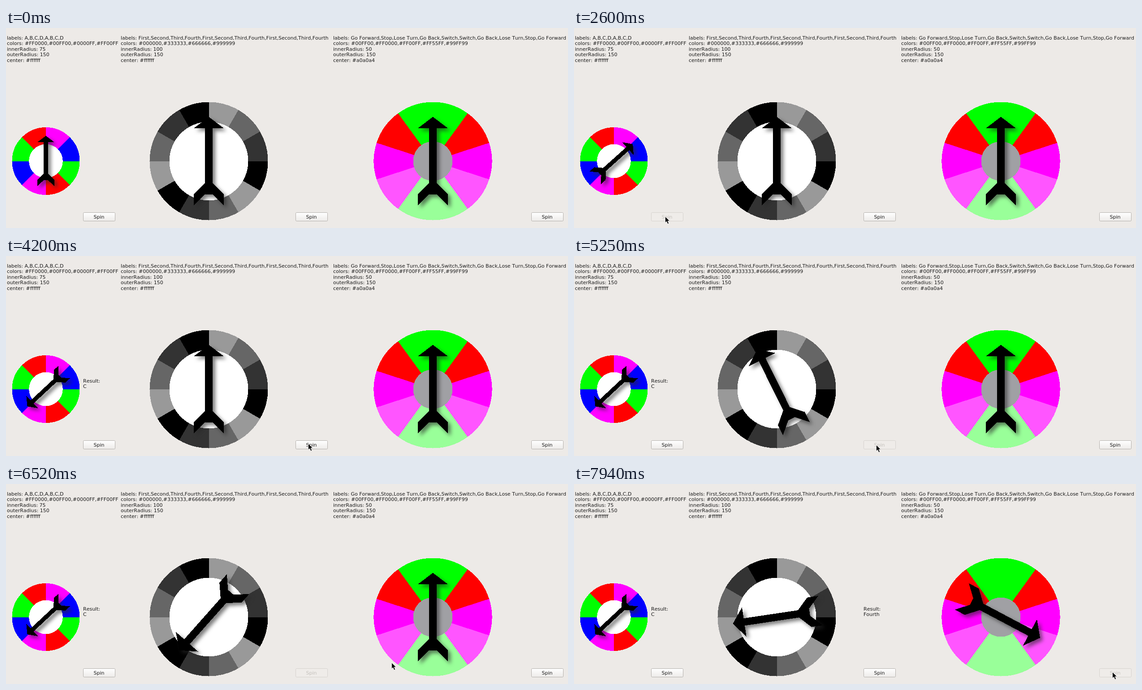
An HTML page for the animation above (8 s loop, 1254 px wide and 447 px high).

```html
<!DOCTYPE html>
<html lang="en">
<head>
<meta charset="utf-8">
<title>Spinners</title>
<style>
  html, body { margin: 0; width: 100%; height: 100%; overflow: hidden; background: #edeae7; }
  svg { display: block; width: 100%; height: 100%; }
  text { font: 11px "DejaVu Sans", sans-serif; font-kerning: none; fill: #1a1a1a; white-space: pre; }
  .crisp { shape-rendering: crispEdges; }
  .shadow { filter: drop-shadow(6px 6px 4px rgba(40, 40, 40, .6)); }
  .button text { text-anchor: middle; }
  .button rect { fill: url(#face); stroke: #b4b0ac; }
  .button.off rect { fill: #efece9; stroke: #d6d2ce; }
  .button.off text { fill: #c4c0bc; }
</style>
</head>
<body>
<svg id="stage" viewBox="0 0 1254 447">
  <defs>
    <linearGradient id="face" x2="0" y2="1">
      <stop offset="0" stop-color="#fff"/>
      <stop offset="1" stop-color="#edebe9"/>
    </linearGradient>
  </defs>
</svg>
<script>
const LOOP = 8000, STEP = 74, CY = 297.5;
const stage = document.getElementById('stage');
const ARROW = 'M0-99L33.3-73.5H8.2V49L33.3 73.5V98.5L8.2 74H-8.2L-33.3 98.5V73.5L-8.2 49V-73.5H-33.3Z';

// Sector colours run counter-clockwise from the top.
const spinners = [
  {
    textX: 2, cx: 89, radius: 75.5, hole: 37.8, buttonX: 172,
    colors: ['#f00', '#0f0', '#00f', '#f0f'], sectors: 8, center: '#fff',
    info: ['labels: A,B,C,D,A,B,C,D', 'colors: #FF0000,#00FF00,#0000FF,#FF00FF',
      'innerRadius: 75', 'outerRadius: 150', 'center: #ffffff'],
    press: 2135, start: 2155, duration: 1555, turn: 947, result: 'C'
  },
  {
    textX: 256, cx: 452.5, radius: 132, hole: 88, buttonX: 646,
    colors: ['#000', '#333', '#666', '#999'], sectors: 12, center: '#fff',
    info: ['labels: ' + Array(3).fill('First,Second,Third,Fourth').join(),
      'colors: #000000,#333333,#666666,#999999',
      'innerRadius: 100', 'outerRadius: 150', 'center: #ffffff'],
    press: 4805, start: 4825, duration: 1997, turn: 981.5, result: 'Fourth'
  },
  {
    textX: 730, cx: 952.5, radius: 132, hole: 44, buttonX: 1172,
    colors: ['#0f0', '#f00', '#f0f', '#f5f', '#9f9', '#9f9', '#f5f', '#f0f', '#f00', '#0f0'],
    sectors: 10, center: '#a0a0a4',
    info: ['labels: Go Forward,Stop,Lose Turn,Go Back,Switch,Switch,Go Back,Lose Turn,Stop,Go Forward',
      'colors: #00FF00,#FF0000,#FF00FF,#FF55FF,#99FF99',
      'innerRadius: 50', 'outerRadius: 150', 'center: #a0a0a4'],
    press: 7690, start: 7710, duration: 2000, turn: 686, result: ''
  }
];

// Pointer stops: time, x, y
const stops = [
  [440, 1149, 436], [880, 328, 281], [1020, 328, 281], [1760, 203, 421],
  [2950, 203, 421], [3108, 228, 416], [3760, 660, 404], [4360, 676, 421],
  [4650, 676, 422], [4810, 674, 422], [5620, 674, 422], [5920, 670, 414],
  [6360, 848, 405], [6512, 860, 399], [7020, 1201, 422], [7330, 1201, 421],
  [7410, 1201, 420]
];

function add(parent, tag, attrs, content) {
  const el = document.createElementNS('http://www.w3.org/2000/svg', tag);
  for (const key in attrs) el.setAttribute(key, attrs[key]);
  if (content) el.textContent = content;
  return parent.appendChild(el);
}

function sector(r, from, to) {
  const at = a => `${-r * Math.sin(a)} ${-r * Math.cos(a)}`;
  return `M0 0L${at(from)}A${r} ${r} 0 0 0 ${at(to)}Z`;
}

function build(s) {
  s.info.forEach((line, i) =>
    add(stage, 'text', { x: s.textX, y: Math.round(26 + i * 12.45) }, line));

  const wheel = add(stage, 'g', { transform: `translate(${s.cx} ${CY})`, class: 'crisp' });
  const slice = 2 * Math.PI / s.sectors;
  for (let i = 0; i < s.sectors; i++) {
    add(wheel, 'path', {
      d: sector(s.radius, i * slice, (i + 1) * slice),
      fill: s.colors[i % s.colors.length]
    });
  }
  add(wheel, 'circle', { r: s.hole, fill: s.center });
  s.arrow = add(add(wheel, 'g', { class: 'shadow' }), 'path', { d: ARROW });

  s.output = add(stage, 'g', {});
  add(s.output, 'text', { x: s.buttonX, y: 283 }, 'Result:');
  add(s.output, 'text', { x: s.buttonX, y: 295 }, s.result);

  s.button = add(stage, 'g', { class: 'button' });
  add(s.button, 'rect', { x: s.buttonX + .5, y: 412.5, width: 71, height: 19, rx: 2 });
  add(s.button, 'text', { x: s.buttonX + 35.5, y: 426 }, 'Spin');
}

spinners.forEach(build);
const pointer = add(stage, 'path', {
  d: 'M.5 .5V14L3.6 11.2L6 16.8L8.6 15.7L6.2 10.2H10.4Z',
  stroke: '#fff', 'stroke-width': .8
});

function pointerAt(t) {
  const next = stops.findIndex(stop => stop[0] > t);
  if (next < 0) return stops[stops.length - 1].slice(1);
  const [t0, x0, y0] = stops[next - 1], [t1, x1, y1] = stops[next];
  const p = (t - t0) / (t1 - t0), k = p * p * (3 - 2 * p);
  return [Math.round(x0 + (x1 - x0) * k), Math.round(y0 + (y1 - y0) * k)];
}

function draw(time) {
  const t = Math.floor(time / STEP + .25) * STEP;

  for (const s of spinners) {
    const p = Math.min(1, Math.max(0, (t - s.start) / s.duration));
    const angle = s.turn * (1 - Math.pow(1 - p, 1.718));
    s.arrow.setAttribute('transform', `rotate(${angle}) scale(${s.radius / 132})`);
    s.button.classList.toggle('off', t >= s.press && p < 1);
    s.output.style.display = p === 1 ? '' : 'none';
  }

  const shown = t >= stops[0][0];
  pointer.style.display = shown ? '' : 'none';
  if (shown) pointer.setAttribute('transform', `translate(${pointerAt(t)})`);
}

const begin = performance.now();
function frame() {
  draw((performance.now() - begin) % LOOP);
  requestAnimationFrame(frame);
}
frame();
</script>
</body>
</html>
```
